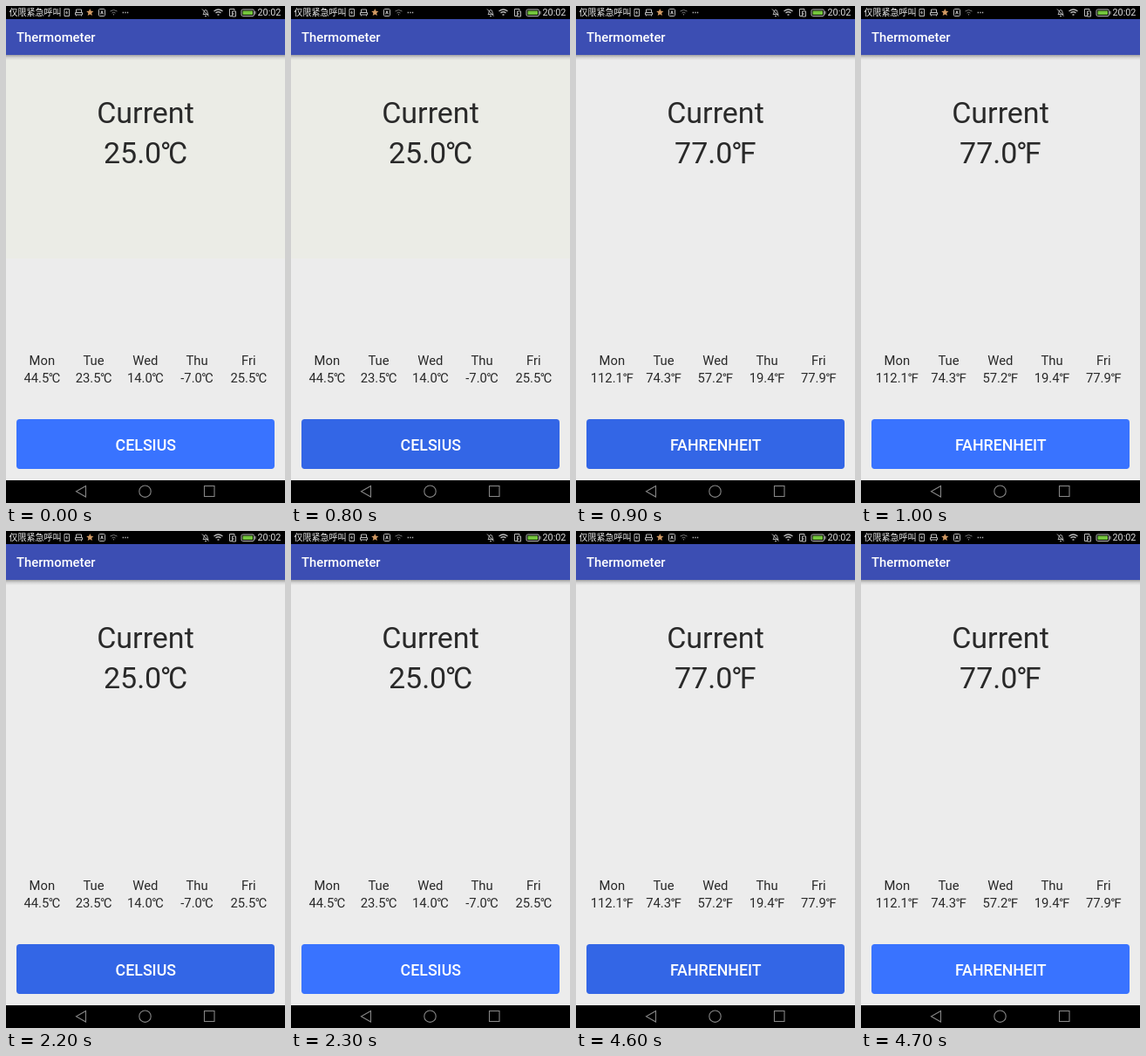
Write an HTML page that moves like this. It is 320x569 px and loops after 4800 ms.

```html
<!DOCTYPE html>
<html lang="en">
<head>
<meta charset="utf-8">
<title>Thermometer</title>
<style>
  html, body { margin: 0; width: 100%; height: 100%; overflow: hidden; background: #000; }
  svg { display: block; width: 100%; height: 100%; }
  text { font-family: Roboto, "Noto Sans CJK SC", "Noto Sans CJK JP", "Noto Sans CJK", sans-serif; fill: #292929; }
  .mid { text-anchor: middle; }
  .big { font-size: 34px; }
  .small { font-size: 14.8px; }
  .bold { font-weight: 500; fill: #fff; }
  .line { fill: none; stroke: #bbb; stroke-width: 1; }
  .nav { fill: none; stroke: #858585; stroke-width: 1.1; }
</style>
</head>
<body>
<svg viewBox="0 0 320 569">
  <defs>
    <linearGradient id="shade" x2="0" y2="1">
      <stop stop-color="#000" stop-opacity=".32"/>
      <stop offset=".5" stop-color="#000" stop-opacity=".1"/>
      <stop offset="1" stop-color="#000" stop-opacity="0"/>
    </linearGradient>
  </defs>
  <rect width="320" height="569"/>
  <rect y="56" width="320" height="487" fill="#ececec"/>
  <rect id="tint" y="60" width="320" height="229" fill="#ebece6"/>
  <rect y="15" width="320" height="41" fill="#3c4eb3"/>
  <rect y="56" width="320" height="6" fill="url(#shade)"/>
  <text class="bold" x="12" y="41" font-size="14.8">Thermometer</text>

  <!-- status bar -->
  <text x="3.5" y="11.2" font-size="10" style="fill:#eee">仅限紧急呼叫</text>
  <g class="line">
    <path d="M67 3.5h5.5v8H67zM69.7 5.5v3M68.5 7.5l1.2 1.2 1.2-1.2"/>
    <path d="M80.5 7V4h6v3M79.5 7.5h8v2.5h-8zM80.5 10v1.5M86.5 10v1.5"/>
    <rect x="106.5" y="3.5" width="7" height="8" rx="1"/>
    <path d="M108.5 9.5l1.5-4 1.5 4M109 8h2"/>
    <path d="M119.5 6q4-3 8 0M121.5 8q2-1.5 4 0M123.5 9v1.5" stroke="#777"/>
    <path d="M226 9.5c1.5-1 .5-5 3-5s1.500 4 3 5zM228 11.500h2M225 3.500l7.500 8"/>
    <path d="M238.500 6q5-4 10 0M240.500 8q3-2.500 6 0M242.500 10h2" stroke-width="1.300"/>
    <path d="M262 5V3.500h-5.500v8H259M259.500 6h4v6h-4zM261 8v2"/>
    <rect x="270" y="4" width="14.500" height="7.500" rx="1.500"/>
    <path d="M286 6v3.500"/>
  </g>
  <path d="M96.300 3l1.200 2.700 2.900.3-2.200 2 .7 2.900-2.600-1.500-2.600 1.500.7-2.900-2.200-2 2.900-.3z" fill="#d29a63"/>
  <rect x="271.500" y="5.500" width="11.500" height="4.500" fill="#72c43c"/>
  <path d="M133.700 7.500h6.500" stroke="#bbb" stroke-width="1.300" stroke-dasharray="1.300"/>
  <text x="288.500" y="11.400" font-size="10.800" style="fill:#ddd">20:02</text>

  <text class="mid big" x="160" y="134">Current</text>
  <text class="mid big" x="160" y="180" id="current"></text>
  <g id="week"></g>
  <rect id="button" x="12" y="473" width="296" height="57" rx="3.700"/>
  <text class="mid bold" x="160.300" y="509" font-size="17.800" id="unit"></text>

  <g class="nav">
    <path d="M91.500 549.500v12.500l-11-6.250z"/>
    <circle cx="159.500" cy="555.700" r="6.700"/>
    <rect x="227.500" y="549.500" width="11.500" height="12"/>
  </g>
</svg>
<script>
const LOOP = 4800;
const $ = id => document.getElementById(id);
const week = [['Mon', 44.5], ['Tue', 23.5], ['Wed', 14], ['Thu', -7], ['Fri', 25.5]];

function format(celsius, fahrenheit) {
  return fahrenheit ? (celsius * 1.8 + 32).toFixed(1) + '℉' : celsius.toFixed(1) + '℃';
}

function addText(x, y, content) {
  const node = document.createElementNS('http://www.w3.org/2000/svg', 'text');
  node.setAttribute('class', 'mid small');
  node.setAttribute('x', x);
  node.setAttribute('y', y);
  node.textContent = content;
  $('week').append(node);
  return node;
}

const readings = week.map(([day, celsius], i) => {
  const x = 41.3 + i * 59.25;
  addText(x, 411, day);
  return { celsius, node: addText(x, 431, '') };
});

const within = (t, from, to) => t >= from && t < to;
let shown = '';

function draw(now) {
  const t = now % LOOP;
  const fahrenheit = within(t, 900, 2200) || t >= 4600;
  const pressed = within(t, 800, 1000) || within(t, 2100, 2300) || within(t, 4600, 4700);
  const tinted = t < 900;
  const state = [fahrenheit, pressed, tinted].join();
  if (state !== shown) {
    shown = state;
    $('current').textContent = format(25, fahrenheit);
    for (const { celsius, node } of readings) node.textContent = format(celsius, fahrenheit);
    $('unit').textContent = fahrenheit ? 'FAHRENHEIT' : 'CELSIUS';
    $('button').setAttribute('fill', pressed ? '#3366e6' : '#3973ff');
    $('tint').setAttribute('visibility', tinted ? 'visible' : 'hidden');
  }
  requestAnimationFrame(() => draw(performance.now() - start));
}

const start = performance.now();
draw(0);
</script>
</body>
</html>
```
